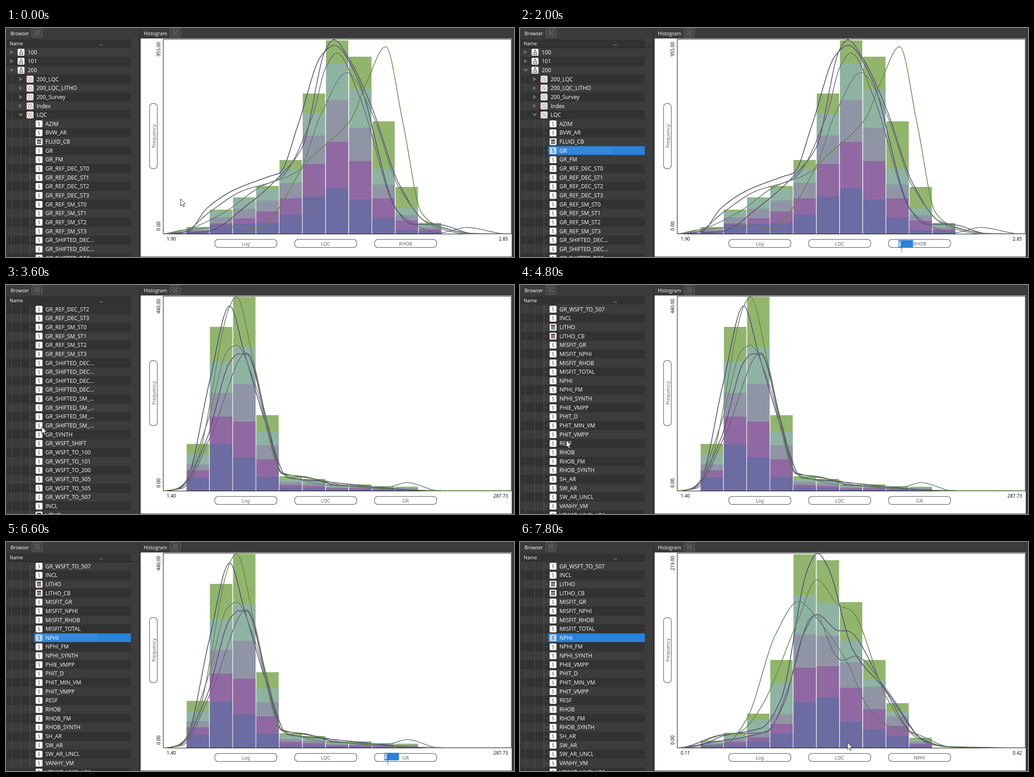
Recreate the animation shown at these times as an HTML page with a canvas. Size 1113 px wide and 503 px high, loop 8 s.

```html
<!DOCTYPE html>
<html lang="en">
<head>
<meta charset="utf-8">
<title>Log histogram</title>
<style>
html, body { margin: 0; width: 100%; height: 100%; overflow: hidden; background: #3b3b3b; }
canvas { display: block; }
</style>
</head>
<body>
<canvas id="stage" width="1113" height="503"></canvas>
<script>
const ctx = document.getElementById('stage').getContext('2d');
const LOOP = 8000, STEP = 200;
const ROW = 19.65, LIST_TOP = 43.5, BLUE = '#2a82da';
const UI = '"Open Sans", "Noto Sans", sans-serif', LABEL = '"DejaVu Sans", sans-serif';
const BASE = 452, LEFT = 344.5, RIGHT = 1107, BAR = 50.85;
const FILLS = ['#92b56d', '#8fb3a2', '#9095a5', '#9069a2', '#6c6ca2'];
const LINES = ['#46467f', '#5f4577', '#66657b', '#5f806f', '#668640'];

// Tree: names by depth
const series = (prefix, list) => list.split(' ').map(s => prefix + s);
const leaves = [
  ...'AZIM BVW_AR FLUID_CB GR GR_FM'.split(' '),
  ...series('GR_REF_DEC_ST', '0 1 2 3'), ...series('GR_REF_SM_ST', '0 1 2 3'),
  ...Array(4).fill('GR_SHIFTED_DEC...'), ...Array(4).fill('GR_SHIFTED_SM_...'),
  'GR_SYNTH', ...series('GR_WSFT_', 'SHIFT TO_100 TO_101 TO_200 TO_305 TO_505 TO_507'),
  ...'INCL LITHO LITHO_CB'.split(' '), ...series('MISFIT_', 'GR NPHI RHOB TOTAL'),
  ...('NPHI NPHI_FM NPHI_SYNTH PHIE_VMPP PHIT_D PHIT_MIN_VM PHIT_VMPP RESF RHOB RHOB_FM ' +
    'RHOB_SYNTH SH_AR SW_AR SW_AR_UNCL VANHY_VM VPWAT_UNCL_VM').split(' ')
];
const level = (depth, names) => names.map(name => ({ depth, name }));
const rows = [
  ...level(0, ['100', '101', '200']),
  ...level(1, ['200_LQC', '200_LQC_LITHO', '200_Survey', 'Index', 'LQC']),
  ...level(2, leaves)
];

// Smooth lines through a few x, y pairs, one per well
const rhobLines = {
  a: [398, 447, 440, 396, 497, 357, 577, 326, 600, 318, 640, 212, 690, 62, 719, 38, 770, 110, 855, 398, 890, 431, 950, 432, 1020, 451],
  b: [440, 447, 530, 388, 600, 325, 650, 260, 700, 48, 718, 26, 752, 68, 803, 178, 860, 340, 920, 425, 1030, 452],
  c: [390, 447, 445, 405, 515, 359, 600, 330, 672, 192, 700, 88, 725, 55, 775, 152, 860, 405, 950, 450, 1010, 438, 1095, 452],
  d: [400, 441, 480, 404, 555, 350, 642, 312, 690, 190, 747, 98, 800, 182, 860, 348, 930, 432, 1010, 452],
  e: [385, 444, 490, 437, 550, 440, 585, 412, 660, 293, 718, 241, 757, 199, 790, 120, 832, 41, 870, 210, 910, 405, 945, 434, 1030, 452]
};
const grLines = {
  a: [372, 448, 395, 430, 446, 212, 490, 46, 522, 148, 575, 322, 617, 423, 690, 431, 950, 452],
  b: [380, 447, 440, 338, 490, 170, 510, 151, 528, 152, 570, 298, 605, 415, 655, 421, 730, 440, 950, 452],
  c: [385, 447, 450, 328, 527, 149, 575, 310, 605, 413, 665, 424, 720, 439, 950, 452],
  d: [380, 446, 440, 306, 485, 145, 505, 132, 545, 215, 605, 415, 730, 441, 840, 443, 878, 434, 950, 452],
  e: [375, 448, 420, 380, 490, 47, 505, 26, 545, 180, 605, 412, 700, 430, 735, 439, 950, 452]
};
const nphiLines = {
  a: [395, 446, 445, 426, 530, 408, 572, 345, 630, 60, 652, 25, 675, 56, 730, 238, 800, 324, 890, 439, 940, 450],
  b: [420, 440, 540, 416, 580, 350, 620, 205, 650, 159, 700, 195, 715, 195, 800, 325, 860, 420, 940, 450],
  c: [450, 422, 540, 418, 590, 313, 635, 168, 648, 160, 690, 247, 706, 260, 735, 251, 800, 320, 895, 443, 940, 450],
  d: [450, 443, 497, 388, 560, 203, 610, 131, 660, 180, 720, 270, 760, 360, 800, 400, 860, 418, 950, 451],
  e: [440, 425, 480, 418, 525, 368, 610, 170, 650, 83, 700, 140, 725, 150, 805, 345, 870, 430, 940, 449]
};

// bars: edges of the stacked parts, top down, from the second bin on; a lone top is split evenly
const rhob = {
  name: 'RHOB', top: '955.00', min: '1.90', max: '2.85', lines: rhobLines,
  bars: [[437], [399, 403, 416, 429, 432], [372, 374, 397, 418, 430], [347, 353, 379, 403, 428],
    [290, 311, 340, 374, 409], [144, 187, 236, 299, 370], [27, 78, 158, 250, 352],
    [63, 135, 219, 292, 377], [205, 309, 344, 374, 416], [349, 396, 411, 423, 444], [428]]
};
const gr = {
  name: 'GR', top: '440.00', min: '1.40', max: '287.73', lines: grLines,
  bars: [[349, 372, 394, 407, 423], [92, 169, 237, 289, 350], [26, 137, 217, 300, 378],
    [286, 321, 352, 383, 421], [420], [426], [438], [438], [443], [443], [450]]
};
const nphi = {
  name: 'NPHI', top: '219.00', min: '0.11', max: '0.42', lines: nphiLines,
  bars: [[436], [419], [377, 391, 418, 429, 438], [259, 309, 378, 400, 421],
    [27, 118, 203, 276, 352], [40, 133, 206, 273, 342], [132, 217, 264, 320, 395],
    [259, 302, 318, 367, 412], [354, 372, 383, 404, 426], [430]]
};

// Motion: [time, x, y] or [time, value]
const pointer = [[0, 382, 375], [400, 125, 238], [600, 93, 262], [2400, 93, 262],
  [2600, 866, 475], [2800, 866, 475], [3400, 78, 311], [4400, 78, 311],
  [4800, 101, 341], [5200, 93, 205], [7200, 880, 475], [7800, 717, 440]];
const drags = [
  [[1200, 100, 268], [2000, 829, 466]],
  [[5600, 100, 208], [6400, 816, 392], [6600, 829, 463]]
];
const wheel = [[3200, 0], [3400, 6], [3600, 15], [3800, 21], [4000, 24], [4400, 36]];

function track(keys, t) {
  const i = keys.findIndex(k => k[0] > t);
  if (i < 0) return keys[keys.length - 1].slice(1);
  if (i === 0) return keys[0].slice(1);
  const a = keys[i - 1], b = keys[i], f = (t - a[0]) / (b[0] - a[0]);
  return a.slice(1).map((v, n) => v + (b[n + 1] - v) * f);
}

function rect(x, y, w, h, fill) {
  ctx.fillStyle = fill;
  ctx.fillRect(x, y, w, h);
}
function text(s, x, y, font, fill, align = 'left') {
  ctx.font = font;
  ctx.fillStyle = fill;
  ctx.textAlign = align;
  ctx.fillText(s, x, y);
}
function path(points, close) {
  ctx.beginPath();
  for (let i = 0; i < points.length; i += 2) ctx.lineTo(points[i], points[i + 1]);
  if (close) ctx.closePath();
}
function stroke(color, width = 1) {
  ctx.strokeStyle = color;
  ctx.lineWidth = width;
  ctx.stroke();
}
function line(color, ...points) {
  path(points);
  stroke(color);
}
function rounded(x, y, w, h, r) {
  ctx.beginPath();
  ctx.roundRect(x, y, w, h, r);
}
function upright(s, x, y, font, fill) {
  ctx.save();
  ctx.translate(x, y);
  ctx.rotate(-Math.PI / 2);
  text(s, 0, 0, font, fill, 'center');
  ctx.restore();
}

// Monotone cubic from the left end of the axis to the right
function curve(points, color) {
  const p = [LEFT, BASE, ...points, RIGHT, BASE];
  const n = p.length / 2, x = i => p[2 * i], y = i => p[2 * i + 1];
  const slope = i => (y(i + 1) - y(i)) / (x(i + 1) - x(i));
  const tangent = i => {
    if (i === 0 || i === n - 1) return 0;
    const a = slope(i - 1), b = slope(i);
    return a * b <= 0 ? 0 : 2 * a * b / (a + b);
  };
  ctx.beginPath();
  ctx.moveTo(x(0), y(0));
  for (let i = 0; i < n - 1; i++) {
    const d = (x(i + 1) - x(i)) / 3;
    ctx.bezierCurveTo(x(i) + d, y(i) + d * tangent(i), x(i + 1) - d, y(i + 1) - d * tangent(i + 1), x(i + 1), y(i + 1));
  }
  stroke(color, 1.6);
}

function pill(x, y, w, h) {
  rounded(x, y, w, h, 7);
  stroke('#777', 1.5);
}

function chart(c) {
  rect(295, 23, 813, 479, '#fff');
  c.bars.forEach((edges, i) => {
    const x = LEFT + (i + 1) * BAR + 0.5, top = edges[0];
    FILLS.forEach((fill, k) => {
      const y = edges.length > 1 ? edges[k] : top + (BASE - top) * k / 5;
      rect(x, y, BAR - 1.8, BASE - y, fill);
    });
  });
  ctx.strokeStyle = '#000';
  ctx.lineWidth = 1;
  ctx.strokeRect(LEFT, 24.5, RIGHT - LEFT, BASE - 24);
  Object.values(c.lines).forEach((p, i) => curve(p, LINES[i]));

  const axis = '10.3px ' + UI, label = '10px ' + LABEL;
  upright(c.top, 338, 46.5, axis, '#000');
  upright('0.00', 338, 435, axis, '#000');
  text(c.min, 352, 467, axis, '#000');
  text(c.max, 1100, 467, axis, '#000', 'right');
  pill(314.5, 166, 17, 143);
  upright('Frequency', 328, 237, label, '#666');
  ['Log', 'LQC', c.name].forEach((s, i) => {
    pill(457.5 + i * 175, 464.5, 136, 17.5);
    text(s, 525.5 + i * 175, 477.5, label, '#666', 'center');
  });
}

function squiggle(x, y, color, h = 4.5) {
  ctx.beginPath();
  ctx.moveTo(x + 1, y - h);
  ctx.bezierCurveTo(x - 5, y - 1, x + 5, y + 1, x - 1, y + h);
  stroke(color, 1.1);
}

function icon(row, x, y, selected) {
  rounded(x, y - 7.5, 15, 15, 2);
  ctx.fillStyle = selected ? '#b8d6f3' : '#fff';
  ctx.fill();
  if (row.depth === 0) {
    path([x + 4, y + 5, x + 6.5, y - 5, x + 8.5, y - 5, x + 11, y + 5], true);
    stroke('#444', 1.2);
    line('#444', x + 5, y + 1, x + 10, y + 1);
  } else if (row.depth === 1) {
    ['#d04040', '#555', '#3d7fc0'].forEach((c, i) => squiggle(x + 3.5 + 4 * i, y, c, 5.5));
  } else if (/^LITHO|^FLUID/.test(row.name)) {
    ['#333', '#a5532c', '#2f6da0'].forEach((c, i) => rect(x + 3, y - 5 + i * 3.6, 9, 2.8, c));
  } else squiggle(x + 7.5, y, '#333');
}

function arrow(x, y, open) {
  path(open ? [x - 5.5, y - 3, x + 5.5, y - 3, x, y + 3.5] : [x - 3.5, y - 5, x + 4, y, x - 3.5, y + 5], true);
  ctx.fillStyle = '#6b6b6b';
  ctx.fill();
}

function browser(scroll, selected, dragging) {
  rect(2, 24, 288, 479, '#3c3c3c');
  ctx.save();
  ctx.beginPath();
  ctx.rect(2, LIST_TOP, 288, 460);
  ctx.clip();
  for (let i = scroll; i < Math.min(rows.length, scroll + 24); i++) {
    const row = rows[i], top = LIST_TOP + (i - scroll) * ROW, y = top + ROW / 2;
    const on = row.name === selected, x = 26 + row.depth * 19.7;
    const open = row.name === '200' || row.name === 'LQC';
    if (i % 2) rect(2, top, 271.5, ROW, '#323232');
    if (i > 2) line('#4c4c4c', 12.5, top, 12.5, top + ROW);
    if (row.depth === 2) {
      line('#4c4c4c', 32.5, top, 32.5, top + ROW);
      line('#555', 52.5, top, 52.5, top + ROW);
      line('#555', 52.5, y, 62, y);
    } else arrow(x - 13.5, y, open);
    if (on) {
      rect(62, top, 211.5, ROW - 0.5, BLUE);
      if (dragging) rect(62, top, 138, ROW - 4, 'rgba(255,255,255,.05)');
    }
    icon(row, x - 0.5, y, on);
    text(row.name, x + 21.5 - row.depth * 0.2, y + 4.3, '12px ' + UI, '#fff');
  }
  ctx.restore();
  rect(2, 25, 271.5, 18, '#323232');
  text('Name', 8, 37.5, '10.5px ' + UI, '#fff');
  text('...', 204, 37.5, '11px ' + UI, '#fff');
  if (dragging) rect(3, 43, 286, 1, '#222');
}

function tab(name, x, button) {
  text(name, x, 15.5, '10.5px ' + UI, '#fff');
  rounded(button + 0.5, 0.5, 23, 20, 2);
  ctx.fillStyle = '#444';
  ctx.fill();
  stroke('#666');
  const cx = button + 12, cy = 10.5;
  ctx.strokeRect(cx - 5, cy - 5, 10, 10);
  line('#888', cx - 4, cy - 4, cx + 4, cy + 4);
  line('#888', cx + 4, cy - 4, cx - 4, cy + 4);
}

function arrowCursor(x, y) {
  ctx.save();
  ctx.translate(x + 0.5, y + 0.5);
  path([0, 0, 0, 15, 3.5, 12, 6, 17.5, 8.5, 16.5, 6, 11, 10.5, 10.5], true);
  ctx.fillStyle = '#fff';
  ctx.fill();
  stroke('#222');
  ctx.restore();
}

function dragCursor(x, y) {
  rect(x, y, 32, 16.5, BLUE);
  rect(x + 1, y + 2, 5, 12, '#b8d6f3');
  ctx.setLineDash([3, 2]);
  line('#111', x + 3, y + 4, x + 7.5, y + 9, x + 7.5, y + 28);
  ctx.setLineDash([]);
}

function draw(now) {
  const t = Math.floor(now % LOOP / STEP) * STEP;
  const scroll = Math.round(track(wheel, t)[0]);
  const selected = t < 1000 ? '' : t < 5400 ? 'GR' : 'NPHI';
  const drag = t >= 1200 && t < 2600 ? drags[0] : t >= 5600 && t < 7400 ? drags[1] : null;

  rect(0, 0, 1113, 503, '#3b3b3b');
  rect(291, 0, 4, 503, '#343434');
  tab('Browser', 10, 56);
  tab('Histogram', 302, 359);
  browser(scroll, selected, !!drag);
  chart(t < 2600 ? rhob : t < 7400 ? gr : nphi);
  if (drag) dragCursor(...track(drag, t));
  else arrowCursor(...track(pointer, t));
}

let start;
function tick(now) {
  start ??= now;
  draw(now - start);
  requestAnimationFrame(tick);
}
draw(0);
requestAnimationFrame(tick);
</script>
</body>
</html>
```
